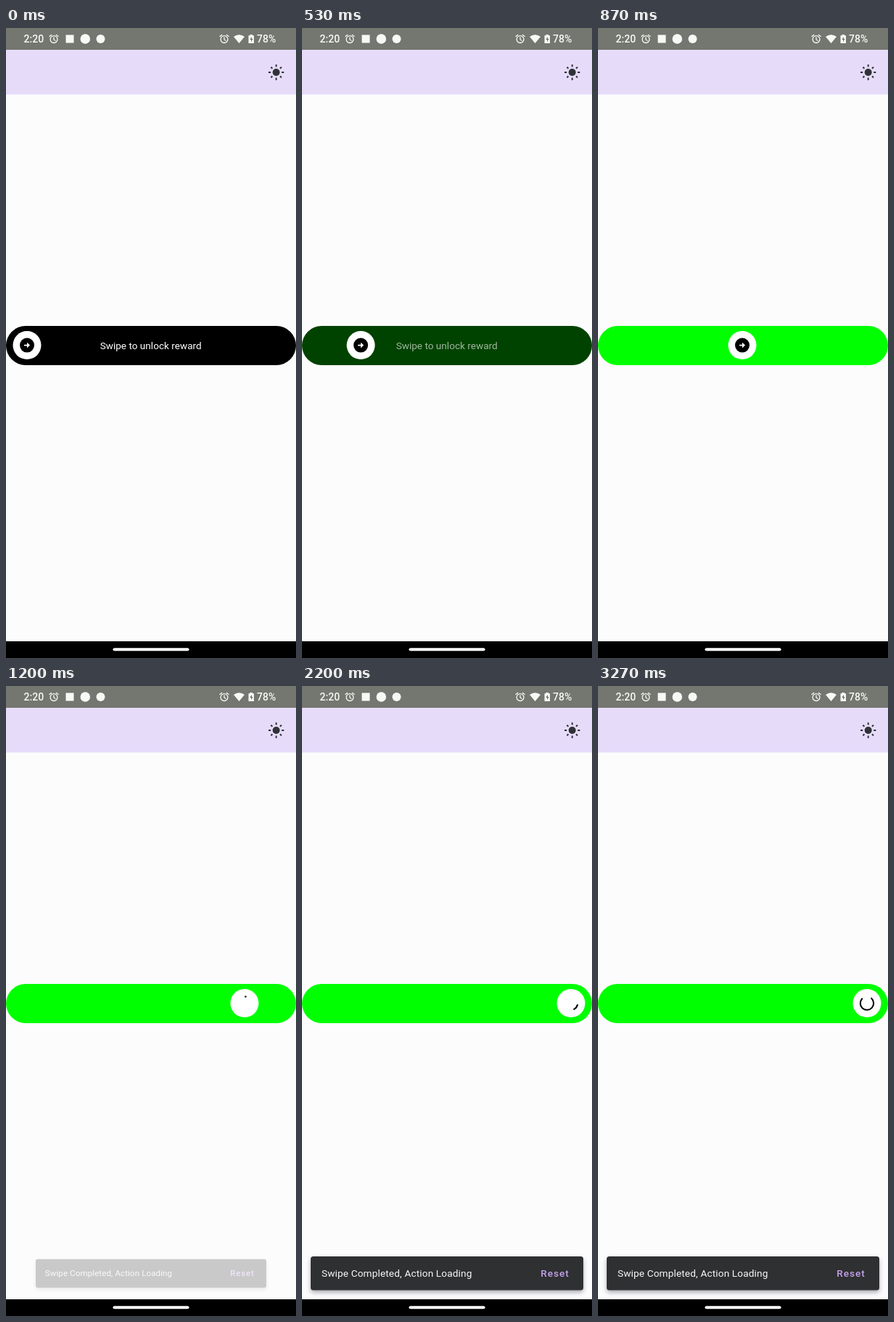
Recreate the animation shown at these times as an HTML page. Size 400 by 867 pixels, loop 3340 ms.

```html
<!DOCTYPE html>
<html lang="en">
<head>
<meta charset="utf-8">
<title>Swipe to unlock</title>
<style>
html, body { margin: 0; width: 100%; height: 100%; overflow: hidden; background: #fdfcfd; }
svg { display: block; width: 100vw; height: 100vh; }
text { font-family: Roboto, sans-serif; font-size: 13.6px; }
.status { font-size: 14px; font-weight: 500; }
#snack { transform-origin: 200px 808.5px; }
#panel { filter: drop-shadow(0 3px 3px rgba(40, 45, 60, .4)); }
</style>
</head>
<body>
<svg viewBox="0 0 400 867">
  <defs>
    <g id="alarm" fill="none" stroke="#f8f9f6" stroke-width="1.3" stroke-linecap="round">
      <circle r="4.9" cy=".6"/>
      <path d="M0-2.2V1L2 2.2M-6-3.4L-3.4-5.6M6-3.4L3.4-5.6"/>
    </g>
  </defs>

  <rect width="400" height="867" fill="#fdfcfd"/>
  <rect y="30" width="400" height="61.5" fill="#e6dcfa"/>
  <rect width="400" height="30" fill="#747670"/>

  <g fill="#f8f9f6">
    <text class="status" x="24.5" y="19.5">2:20</text>
    <use href="#alarm" x="66" y="15"/>
    <rect x="82.5" y="9.5" width="11" height="11"/>
    <circle cx="109.3" cy="15" r="6.8"/>
    <circle cx="130.5" cy="15" r="6"/>
    <use href="#alarm" x="301" y="15"/>
    <path d="M314 12Q321.5 6.5 329 12L321.5 21Z"/>
    <path d="M336.5 9h3.5v1.3h2V21h-7.5V10.3h2Z"/>
    <path d="M339 12l-2.7 4h1.7v3l2.7-4H339Z" fill="#747670"/>
    <text class="status" x="346" y="19.5">78%</text>
  </g>

  <g transform="translate(372.7 61)" stroke="#303236" stroke-width="2">
    <circle r="5" fill="#303236" stroke="none"/>
    <path d="M0-10.7V-7.5M0 10.7V7.5M-10.7 0H-7.5M10.7 0H7.5"/>
    <path d="M-7.3-7.3l2 2M7.3-7.3l-2 2M-7.3 7.3l2-2M7.3 7.3l-2-2"/>
  </g>

  <rect id="bar" y="410" width="400" height="54" rx="27"/>
  <text id="label" x="199.7" y="441.8" text-anchor="middle" fill="#fff">Swipe to unlock reward</text>
  <g id="knob">
    <circle r="19.5" fill="#fff"/>
    <g id="arrow">
      <circle r="10"/>
      <path d="M-4-.9H0V-3.8L4 0L0 3.8V.9H-4Z" fill="#fff"/>
    </g>
    <path id="ring" fill="none" stroke="#000" stroke-width="2" stroke-linecap="square"/>
  </g>

  <g id="snack">
    <rect id="panel" x="12" y="785" width="376" height="46.5" rx="3.5" fill="#2f3032"/>
    <text x="27" y="813" fill="#f8f8f8" letter-spacing=".15">Swipe Completed, Action Loading</text>
    <text x="329.3" y="813" fill="#c6a4ee" font-weight="500" letter-spacing=".95">Reset</text>
  </g>

  <rect y="844" width="400" height="23"/>
  <rect x="147.5" y="853.3" width="105" height="4" rx="2" fill="#fff"/>
</svg>
<script>
const LOOP = 3340, STEP = 1000 / 15, DONE = 1163;
const START_X = 29, END_X = 371;
const path = [[267, 29], [333, 37], [400, 48], [533, 81], [667, 121],
              [1133, 303], [1200, 329], [1267, 356], [1333, 371]];
const el = id => document.getElementById(id);
const clamp = v => Math.max(0, Math.min(1, v));
const show = (id, on) => el(id).setAttribute("visibility", on ? "visible" : "hidden");

// cubic-bezier(.4, 0, .2, 1), solved by bisection
function ease(x) {
  let lo = 0, hi = 1;
  if (x <= 0 || x >= 1) return clamp(x);
  for (let i = 0; i < 20; i++) {
    const s = (lo + hi) / 2, r = 1 - s;
    if (1.2 * r * r * s + .6 * r * s * s + s ** 3 < x) lo = s; else hi = s;
  }
  return 3 * (1 - lo) * lo * lo + lo ** 3;
}

function knobX(t) {
  if (t <= path[0][0]) return START_X;
  const i = path.findIndex(p => p[0] > t);
  if (i < 0) return END_X;
  const [t0, x0] = path[i - 1], [t1, x1] = path[i];
  return x0 + (x1 - x0) * (t - t0) / (t1 - t0);
}

// Indeterminate spinner: head grows, then tail catches up, while all rotates
function ringPath(t) {
  const cycle = 1332, n = Math.floor(t / cycle), u = t % cycle / cycle;
  const tail = 290 * ease(2 * u - 1), head = 290 * ease(2 * u);
  const base = 286 * u + 216 * n - 90, r = 9.2;
  const point = deg => {
    const a = deg * Math.PI / 180;
    return `${r * Math.cos(a)} ${r * Math.sin(a)}`;
  };
  const sweep = Math.max(head - tail, .5);
  return `M${point(base + tail)}A${r} ${r} 0 ${+(sweep > 180)} 1 ${point(base + tail + sweep)}`;
}

function draw(t) {
  const x = knobX(t), loading = t >= DONE;
  const fill = clamp(2.5 * (x - START_X) / (END_X - START_X));
  // Perceptual black-to-green blend: linear light is fill cubed
  const green = 255 * clamp(1.055 * fill ** 1.25 - .055);
  el("bar").setAttribute("fill", `rgb(0,${Math.round(green)},0)`);
  el("label").setAttribute("opacity", 1 - fill);
  el("knob").setAttribute("transform", `translate(${x} 436.6)`);
  show("arrow", !loading);
  show("ring", loading);
  show("snack", loading);
  if (!loading) return;
  const k = clamp((t - DONE) / 150);
  el("ring").setAttribute("d", ringPath(t - DONE));
  el("snack").style.opacity = k;
  el("snack").style.transform = `scale(${.8 + .2 * ease(k)})`;
}

const begin = performance.now();
function tick() {
  const t = (performance.now() - begin) % LOOP;
  draw(Math.floor((t + 4) / STEP) * STEP);
  requestAnimationFrame(tick);
}
tick();
</script>
</body>
</html>
```
